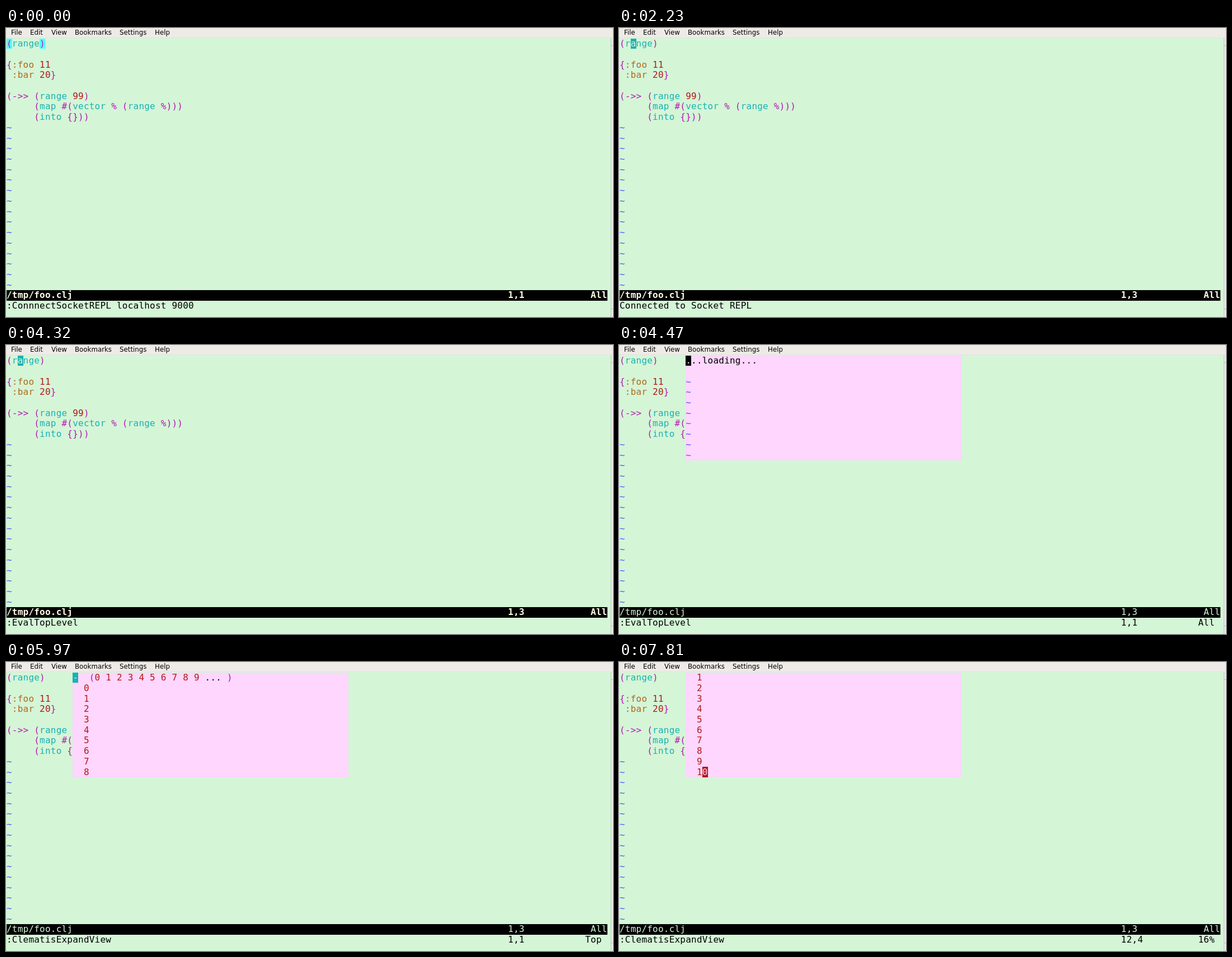
Write an HTML page with a canvas that moves like this. It is 1085 px wide and 516 px high and loops after 8 s.

```html
<!DOCTYPE html>
<html lang="en">
<head>
<meta charset="utf-8">
<title>Editor session</title>
<style>
  html, body { margin: 0; width: 100%; height: 100%; overflow: hidden; background: #d5f5d7; }
  canvas { display: block; }
</style>
</head>
<body>
<canvas id="stage" width="1085" height="516"></canvas>
<script>
const ctx = document.getElementById('stage').getContext('2d');
const LOOP = 8000;
const CELL_W = 9.85, CELL_H = 18.715, LEFT = 1, TOP = 18.7;
const COLS = 109, STATUS_ROW = 24, COMMAND_ROW = 25;
const POPUP = { col: 12, cols: 50, rows: 10 };
const C = {
  paper: '#d5f5d7', popup: '#fed6fe', black: '#000000', bold: '#fffbe6',
  purple: '#b218b2', teal: '#18b2b2', brown: '#b26818', red: '#b21818',
  blue: '#5454ff', match: '#54ffff'
};

const CODE = [
  '(range)', '', '{:foo 11', ' :bar 20}', '',
  '(->> (range 99)', '     (map #(vector % (range %)))', '     (into {}))'
];
const MENU = [['File', 10], ['Edit', 44], ['View', 82], ['Bookmarks', 124], ['Settings', 204], ['Help', 267]];

const digits = count => Array.from({ length: count }, (_, i) => '  ' + i);
const summary = sign => sign + '  (0 1 2 3 4 5 6 7 8 9 ... )';
const expanded = count => [summary('-'), ...digits(count), '  ...'];

const CONNECT = ':ConnnectSocketREPL localhost 9000';
const EVAL = ':EvalTopLevel';

// Each entry overrides parts of the state before it; cursor is [screen row, column].
const TIMELINE = [
  [0, { command: CONNECT, cursor: null, position: '1,1', match: true, popup: null, top: 0, ruler: null }],
  [440, { cursor: [0, 0] }],
  [1040, { cursor: [1, 0], position: '2,0-1', match: false }],
  [1190, { command: 'Connected to Socket REPL' }],
  [1780, { cursor: [0, 0], position: '1,1', match: true }],
  [2080, { cursor: [0, 1], position: '1,2', match: false }],
  [2230, { cursor: [0, 2], position: '1,3' }],
  [3130, { command: ':', cursor: [COMMAND_ROW, 1] }],
  [3570, { command: CONNECT, cursor: [COMMAND_ROW, CONNECT.length] }],
  [3720, { command: EVAL, cursor: [COMMAND_ROW, EVAL.length] }],
  [4320, { cursor: [0, 2] }],
  [4470, { popup: ['...loading...', ''], cursor: [0, 12], ruler: ['1,1', 'All'] }],
  [4620, { popup: [summary('+')] }],
  [5970, { popup: expanded(10), command: ':ClematisExpandView', ruler: ['1,1', 'Top'] }],
  [6120, { cursor: [1, 12], ruler: ['2,1', 'Top'] }],
  [6680, { cursor: [2, 12], ruler: ['3,1', 'Top'] }],
  [6830, { cursor: [3, 12], ruler: ['4,1', 'Top'] }],
  [6980, { cursor: [9, 12], top: 1, ruler: ['11,1', '50%'] }],
  [7130, { top: 2, ruler: ['12,1', 'Bot'] }],
  [7550, { cursor: [9, 14], ruler: ['12,3', 'Bot'] }],
  [7670, { cursor: [9, 15], ruler: null }],
  [7810, { popup: expanded(20), ruler: ['12,4', '16%'] }]
];

const stateAt = time => Object.assign({}, ...TIMELINE.filter(([start]) => start <= time).map(([, change]) => change));

let grid;

function put(row, col, text, fg = C.black, bold = false) {
  [...text].forEach((ch, i) => Object.assign(grid[row][col + i], { ch, fg, bold }));
}

function fillCells(row, col, count, bg) {
  for (let i = 0; i < count; i++) Object.assign(grid[row][col + i], { ch: ' ', fg: C.black, bg });
}

function tokenColor(token) {
  if (token.startsWith('...')) return C.black;
  if (/^\d/.test(token)) return C.red;
  if (/^:/.test(token)) return C.brown;
  if (/^([a-z]+|[-+])$/.test(token)) return C.teal;
  return C.purple;
}

function putCode(row, col, line) {
  for (const token of line.matchAll(/\.{3}(loading\.{3})?|->>|:\w+|[a-z]+|\d+|\S/g))
    put(row, col + token.index, token[0], tokenColor(token[0]));
}

function layout(state) {
  grid = Array.from({ length: 26 }, () =>
    Array.from({ length: COLS }, () => ({ ch: ' ', fg: C.black, bg: C.paper, bold: false })));

  for (let row = 0; row < STATUS_ROW; row++) {
    if (row < CODE.length) putCode(row, 0, CODE[row]);
    else put(row, 0, '~', C.blue);
  }
  if (state.match) grid[0][0].bg = grid[0][6].bg = C.match;

  const active = !state.popup;
  fillCells(STATUS_ROW, 0, COLS, C.black);
  for (const [col, text] of [[0, '/tmp/foo.clj'], [91, state.position], [106, 'All']])
    put(STATUS_ROW, col, text, active ? C.bold : C.paper, active);

  put(COMMAND_ROW, 0, state.command);
  if (state.ruler) {
    put(COMMAND_ROW, 91, state.ruler[0]);
    put(COMMAND_ROW, 105, state.ruler[1]);
  }

  if (state.popup) {
    for (let row = 0; row < POPUP.rows; row++) {
      const line = state.popup[state.top + row];
      fillCells(row, POPUP.col, POPUP.cols, C.popup);
      if (line === undefined) put(row, POPUP.col, '~', C.blue);
      else putCode(row, POPUP.col, line);
    }
  }

  if (state.cursor) {
    const cell = grid[state.cursor[0]][state.cursor[1]];
    [cell.fg, cell.bg] = [cell.bg, cell.fg];
  }
}

function rect(color, x, y, w, h) {
  ctx.fillStyle = color;
  ctx.fillRect(x, y, w, h);
}

function drawWindow() {
  rect(C.paper, 0, 0, 1085, 516);
  rect('#eeebe7', 0, 0, 1085, 17);
  rect('#dfe5da', 0, 17, 1085, 1);
  rect('#b4c6b5', 1081, 18, 1, 498);
  rect('#efedea', 1082, 18, 3, 498);
  rect('#bdbbb8', 1082, 31, 3, 1);
  rect('#bdbbb8', 1082, 501, 3, 1);
  ctx.fillStyle = C.black;
  ctx.font = '11.82px "DejaVu Sans", sans-serif';
  for (const [label, x] of MENU) ctx.fillText(label, x - 1, 12);
}

function drawGrid() {
  const edgeX = col => Math.round(LEFT + col * CELL_W);
  const edgeY = row => Math.round(TOP + row * CELL_H);
  grid.forEach((cells, row) => cells.forEach(({ bg }, col) => {
    if (bg !== C.paper)
      rect(bg, edgeX(col), edgeY(row), edgeX(col + 1) - edgeX(col), edgeY(row + 1) - edgeY(row));
  }));
  grid.forEach((cells, row) => cells.forEach(({ ch, fg, bold }, col) => {
    if (ch === ' ') return;
    ctx.font = (bold ? 'bold ' : '') + '16px "DejaVu Sans Mono", monospace';
    ctx.fillStyle = fg;
    ctx.fillText(ch, LEFT + col * CELL_W, TOP + row * CELL_H + 14.5);
  }));
}

const startTime = performance.now();

function frame() {
  layout(stateAt((performance.now() - startTime) % LOOP));
  drawWindow();
  drawGrid();
  requestAnimationFrame(frame);
}
frame();
</script>
</body>
</html>
```
